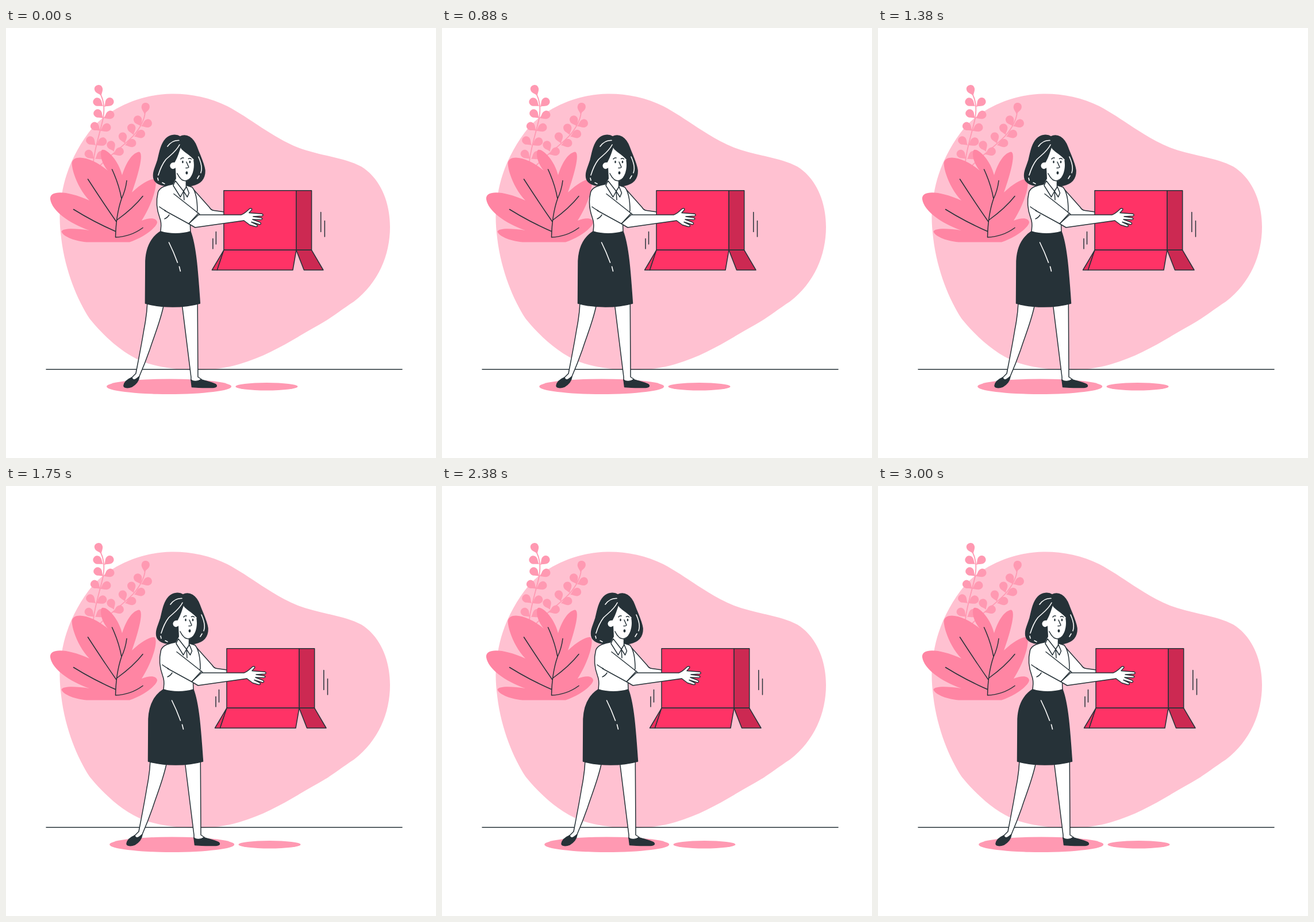
An HTML page for the animation above (3.04 s loop, 748 by 748 pixels).

```html
<!DOCTYPE html>
<html lang="en">
<head>
<meta charset="utf-8">
<title>Woman shaking an empty box</title>
<style>
  html, body { margin: 0; width: 100%; height: 100%; overflow: hidden; background: #fff; }
  svg { display: block; width: 100vw; height: 100vh; }
  .ink { stroke: #263238; stroke-width: 1.5; stroke-linecap: round; stroke-linejoin: round; }
  .line { fill: none; }
  .white { fill: #fff; }
  .dark { fill: #263238; }
  .shine { fill: none; stroke: #fff; stroke-width: 1.6; stroke-linecap: round; }
  .pale { fill: #ff99b2; }
  .red { fill: #f36; }
  .deep { fill: #cc2952; }
</style>
</head>
<body>
<svg viewBox="0 0 748 748">
  <path fill="#ffc1d1" d="M288 114.5C320 114 355 121 385 136C425 157 463 190 508 208C545 222 588 225 618 241C652 262 668 304 668 346C668 395 648 443 605 476C582 491 565 505 545 516C500 541 460 569 405 585C380 592 360 594.5 335 594.5C305 595 270 592 240 581C200 566 165 530 145 505C125 474 103 424 96 365C93 340 92 320 97 290C104 245 125 205 150 174C185 135 240 115 288 114.5Z"/>

  <!-- plant -->
  <g id="sprigs" class="pale">
    <path fill="none" stroke="#ff99b2" stroke-width="1.8" d="M151 246C152 215 163 185 169 157C172 138 170 126 164 114M157 247C172 227 200 210 222 187C234 173 241 160 242 146"/>
  </g>
  <path fill="#ff85a3" d="M140 372.5C115 370 98 361 96.500 354C98 348 120 348 145 352C110 340 80 318 77 298C75 282 105 282 145 300C128 283 115 252 114.500 235C117 217 152 226 177 248C167 236 163 222 166 213C171 206 195 227 202 256C206 243 215 221 229 216C238 212 238 232 219 286C236 270 251 262 258 263C265 266 258 300 236 335C250 329 262 330 263 338C262 347 240 364 215 372.500Z"/>
  <path class="ink line" d="M190.500 364C191 340 194 317 201 297C197 275 191 260 184.500 246M201 297Q208 282 210 265.500M192 337Q169 304 142.500 263M193 334Q222 313 238 292.500M191 354Q152 337 117.500 315.500M190.500 364Q217 363 238 347.500"/>
  <path class="ink" d="M70 593.700H689"/>

  <g id="mover">
    <ellipse class="pale" cx="283.700" cy="623.700" rx="108.500" ry="13.200"/>
    <ellipse class="pale" cx="453.500" cy="623.700" rx="54" ry="6.800"/>

    <!-- legs and shoes -->
    <path class="ink white" d="M246 478C245 500 243 510 240 525C236 550 230 580 226 601L218 609L222 616L232 606C239 590 243 580 250 560C258 535 268 512 274 484Z"/>
    <path class="ink white" d="M306.500 482L322 607V613L333 618L340 611L334 607L333.300 478Z"/>
    <path class="ink dark" d="M205 622C206 616 212 611 219 608C220 612 223 613 227 610L232 606.500C231 614 226 620 219 624C212 627 205 626 205 622Z"/>
    <path class="ink dark" d="M322 612C326 616 334 615 339 611.500C346 614 358 616 365 620C368 623 366 625 360 625.500C348 626 333 625 323.500 624.500Z"/>

    <!-- hair and head -->
    <path class="ink dark" d="M303 189C297 185 285 185 278 193C269 203 267 218 264 230C260 243 255 251 257 261C259 270 270 275 283 274L300 272L318 275C335 273 347 265 346 247C344 234 337 221 332 207C326 191 314 183 303 189Z"/>

    <!-- far arm, blouse -->
    <path class="ink white" d="M322 276L354 312Q357 317 362 317.500L380 320V327L333 326Z"/>
    <path class="ink white" d="M293 271C281 274 268 275 264.500 286C261 300 262 315 267.500 330C272 341 269 348 269 355C285 360 305 360 321 355L320.500 340L333 318C333 303 332 287 324 277L312 273Z"/>

    <path class="white" d="M304 208C305 213 318 219 327 229C329 240 327 253 321 261C318 265 314 267 313 266L313.500 276L310 286L291 271L296 262L295 243C292 246 288 246 286 242C284 238 288 233 293.500 234C298 226 300 220 304 208Z"/>
    <path class="ink line" d="M327 230C329 241 327 253 321 261C317 266 311 267 306 264Q301 260 298 253M313.500 266V277"/>
    <path class="ink white" d="M293 269L291 274L303.500 294L309 284L295 266ZM309 284L315.500 294L318.500 287L314 276Z"/>
    <path class="ink line" d="M309 284L310 299M304 228Q306 225 309 226M317.500 227.500Q320 226 322.500 228M314 233L318 242Q317 244 313 243.500"/>
    <g class="dark">
      <ellipse cx="307.500" cy="233" rx="1.300" ry="2.300"/>
      <ellipse cx="320" cy="233" rx="1.300" ry="2.300"/>
      <ellipse cx="314.500" cy="252" rx="2" ry="2.700"/>
    </g>
    <path class="shine" d="M281 206C286 199 293 195 301 195.500M302 203C296 215 286 221 278 229C271 238 268 246 265 256M264 261L265 265M272 269L276 271M335 224C340 235 342 244 339 252M336 257L333 262"/>

    <!-- skirt -->
    <path class="ink dark" d="M269 354C285 359 305 359 321 354C331 380 334 430 337.500 479C310 487 270 487 242.500 479L243 405C244 385 250 366 269 354Z"/>
    <path class="shine" d="M283.500 373Q292 390 298.500 408M301.500 415L303.500 423"/>

    <!-- box -->
    <g class="ink">
      <path class="red" d="M379 282.700H505V386.300H379Z"/>
      <path class="deep" d="M505 282.700H531.700V386.300H505Z"/>
      <path fill="#ec2f5e" d="M379 386.300L358.500 421H367.500Z"/>
      <path class="red" d="M379 386.300H505L499 421H367.500Z"/>
      <path class="deep" d="M505 386.300H531.700L552 421H518.500Z"/>
      <path d="M547.800 320.500V354.500M554.500 335.500V363M365.500 354.500V376M360 366.500V384"/>
    </g>

    <!-- near arm -->
    <path class="white" d="M268 290L292 288L337 325L329 346L280 319Z"/>
    <path class="ink white" d="M335 325H409C415 323 419 319 423 315C427 312 429 315 427 317L423 321.500L445 323.300C448 324 448 326.500 445 327L430 328L444 330C447 331 446 333.500 443 333.500L429 333L442 338C445 340 443 342.500 440 341.500L427 337.500L436 342C439 344 437 346 434 345.500L424 342.500L414 335L329 347L318 340.500Z"/>
    <path class="ink line" d="M292 288.500L337 324M335 322L318 340.500L276 317.500M267 311Q272 315 278 318M276 332Q281 330 284 325"/>
  </g>
</svg>
<script>
// Each leaf: x and y of its tip, then the direction it points in degrees.
const leaves = [
  [166, 118, -23], [169, 136, -54], [171, 137, 47], [169, 157, -48], [170, 157, 62],
  [164, 179, -50], [164, 179, 62], [156, 204, -48], [157, 204, 60], [153, 228, -45], [155, 228, 57],
  [241, 150, 8], [235, 171, -27], [235, 171, 66], [222, 186, -17], [223, 189, 68],
  [207, 201, -18], [207, 204, 72], [188, 215, -25], [186, 220, 66], [170, 235, 80]
];
const drop = "M0 0C-2-5-8-8-7-14C-6-22 6-22 7-14C8-8 2-5 0 0Z";
document.getElementById("sprigs").insertAdjacentHTML("beforeend",
  leaves.map(([x, y, a]) => `<path d="${drop}" transform="translate(${x} ${y}) rotate(${a})"/>`).join(""));

// Horizontal shake: one stop every tenth of a cycle.
const stops = [0, -1, 2, -4, 4, -4, 4, -4, 2, -1, 0, 0];
const loop = 3040, fps = 24, scale = 1.496;
const mover = document.getElementById("mover");
const start = performance.now();

function draw(now) {
  const ms = Math.max(0, now - start) % loop;
  const step = Math.floor((ms + 5) * fps / 1000);
  const pos = Math.min(10, (step / fps + 0.025) / 0.3);
  const i = Math.floor(pos);
  const x = scale * (stops[i] + (stops[i + 1] - stops[i]) * (pos - i));
  mover.setAttribute("transform", `translate(${x.toFixed(3)} 0)`);
  requestAnimationFrame(draw);
}
draw(start);
</script>
</body>
</html>
```
